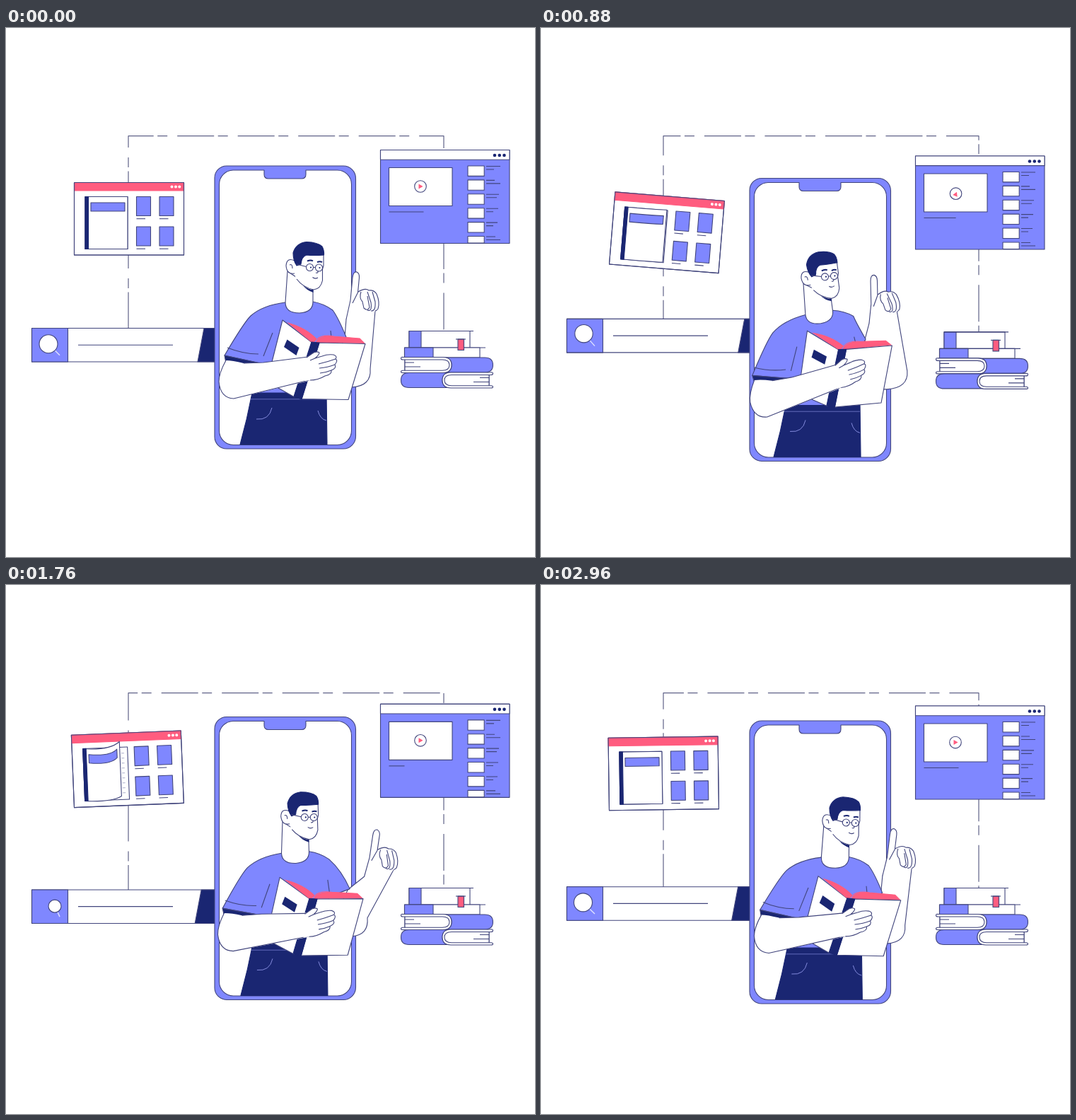
An HTML page with a canvas for the animation above (3.04 s loop, 748 by 748 pixels).

```html
<!DOCTYPE html>
<html>
<head>
<meta charset="utf-8">
<style>
html, body { margin: 0; width: 100%; height: 100%; overflow: hidden; background: #fff; }
canvas { display: block; width: 748px; height: 748px; }
</style>
</head>
<body>
<canvas id="stage" width="748" height="748"></canvas>
<script>
const ctx = document.getElementById('stage').getContext('2d');
const LOOP = 3040, STEP = 80;
const BLUE = '#7f87ff', NAVY = '#1a2672', PINK = '#ff5c7f', WHITE = '#fff', INK = '#41457c';
const TIMES = [0, 560, 1200, 1760, 2160, 2480, 2960];

// Smooth periodic curve through one value per entry of TIMES
function curve(vals, t) {
  const n = TIMES.length;
  const time = i => TIMES[(i + n) % n] + Math.floor(i / n) * LOOP;
  const val = i => vals[(i + n) % n];
  const slope = i => (val(i + 1) - val(i - 1)) / (time(i + 1) - time(i - 1));
  let i = n - 1;
  while (TIMES[i] > t) i--;
  const h = time(i + 1) - time(i), u = (t - time(i)) / h, u2 = u * u, u3 = u2 * u;
  return val(i) * (2 * u3 - 3 * u2 + 1) + val(i + 1) * (3 * u2 - 2 * u3) +
    slope(i) * h * (u3 - 2 * u2 + u) + slope(i + 1) * h * (u3 - u2);
}

// Rotation about (px, py) by deg, then a shift
function pose(px, py, deg, dx, dy) {
  return new DOMMatrix().translate(px + dx, py + dy).rotate(deg).translate(-px, -py);
}
function within(m, paint) {
  ctx.save();
  ctx.transform(m.a, m.b, m.c, m.d, m.e, m.f);
  paint();
  ctx.restore();
}
function at(m, x, y) {
  const p = m.transformPoint({ x, y });
  return p.x.toFixed(2) + ' ' + p.y.toFixed(2) + ' ';
}

function shape(d, fill, ink = INK, w = 1.1) {
  const p = new Path2D(d);
  if (fill) { ctx.fillStyle = fill; ctx.fill(p); }
  if (ink) { ctx.strokeStyle = ink; ctx.lineWidth = w; ctx.stroke(p); }
}
const line = (d, ink = INK, w = 1.1) => shape(d, null, ink, w);
const box = (x, y, w, h, fill, ink = INK) => shape(`M${x} ${y}h${w}v${h}h${-w}z`, fill, ink);
function disc(x, y, r, fill, ink = INK) {
  ctx.beginPath();
  ctx.arc(x, y, r, 0, 7);
  if (fill) { ctx.fillStyle = fill; ctx.fill(); }
  if (ink) { ctx.strokeStyle = ink; ctx.lineWidth = 1.1; ctx.stroke(); }
}

function connector(t) {
  ctx.setLineDash([52, 5.5, 14, 14]);
  ctx.lineDashOffset = -(14.5 + t * 3 * 85.5 / LOOP);
  line('M173 440V152.7H619V429', '#5f6288', 1.2);
  ctx.setLineDash([]);
}

function searchBar(t, s) {
  const y = 424.5 - 13.5 * s, mid = y + 23.7, x = 280 + 8 * s;
  box(36.5, y, 258.5, 47.5, WHITE);
  box(36.5, y, 51, 47.5, BLUE);
  shape(`M${x} ${y}H297V${y + 47.5}H${x - 9}z`, NAVY);
  const gap = 102 + 134 * (t - 1920) / 545;
  if (gap > 102 && gap < 236) line(`M102 ${mid}H${gap - 3}M${gap + 3} ${mid}H236`);
  else line(`M102 ${mid}H236`);
  const cx = 76 + curve([-16, -13, -17, -7, -22, -17, -16.5], t);
  const cy = mid + 14.5 + curve([-16, -18, -16.5, -15, -11, -16, -16], t);
  line(`M${cx} ${cy}L76 ${mid + 14.5}`, '#dfe1ff', 1.4);
  disc(cx, cy, curve([13, 12, 13, 9, 13.3, 13, 13], t), WHITE);
}

function catalog(t, s) {
  const k = Math.max(0, curve([0, 0, 0.25, 1, 0.45, 0.08, 0], t));
  within(pose(96.5, 321, 4.85 * s, 0, 13.4 * s), () => {
    box(96.5, 218.5, 155, 102.5, WHITE);
    box(96.5, 218.5, 155, 11.5, PINK, PINK);
    box(96.5, 218.5, 155, 102.5, null);
    [234.5, 240, 245.3].forEach(x => disc(x, 224.5, 2, WHITE, null));
    for (const x of [184.5, 217]) {
      for (const y of [238.5, 281]) {
        box(x, y, 20, 27, BLUE);
        line(`M${x} ${y + 31.2}h12.5`);
      }
    }
    box(112, 238.5, 60 + 3 * Math.min(1, k * 3), 74, WHITE);
    if (k > 0.5) for (let y = 247; y < 308; y += 7) line(`M166 ${y}h4`, '#9a9dc0', 0.8);
    const r = 172 - 8 * k;
    shape(`M112 238.5Q150 ${238.5 + 4 * k} ${r} ${238.5 - 8 * k}V${312.5 - 5 * k}Q150 ${312.5 + 3 * k} 112 312.5z`, WHITE);
    box(112, 238.5, 4.5, 74, NAVY, NAVY);
    shape(`M120 247Q150 ${247 + 4 * k} ${r - 4} ${247 - 6 * k}v12Q150 ${259 + 4 * k} 120 259z`, BLUE);
  });
}

function player(t, s) {
  const span = (a, b) => Math.min(1, Math.max(0, (t - a) / (b - a)));
  const p = span(800, 1333), q = span(2200, 2690);
  const bp = Math.sin(p * Math.PI), bq = Math.sin(q * Math.PI);
  within(pose(0, 0, 0, 0, 8.7 * s), () => {
    box(529.5, 172.5, 182.5, 132, BLUE);
    box(529.5, 172.5, 182.5, 13.7, WHITE);
    [691, 697.8, 704.5].forEach(x => disc(x, 180, 2.3, NAVY, null));
    box(541.5, 197.5, 89.5, 54, WHITE);
    const hop = curve([0, 0, 3, 0, -3.5, 3, 0], t);
    const cx = 586 + hop / 3, cy = 224 + hop;
    disc(cx, cy, 8.3, WHITE);
    within(pose(0, 0, 360 * (p + q), cx - 2 * bq, cy + 4 * bp - 3 * bq), () =>
      shape('M-2.5 -3.5L3.6 0L-2.5 3.5z', PINK, null));
    line(`M541.5 260h${curve([49, 40, 48, 22, 48, 49, 49], t)}`);
    [[20, 11], [12, 20], [18, 15], [17, 10], [16, 10], [13, 20]].forEach(([a, b], i) => {
      const y = 195 + i * 19.9;
      box(653, y, 23.2, i < 5 ? 14.4 : 9.5, WHITE);
      line(`M679 ${y + 0.5}h${a}M679 ${y + 5}h${b}`);
    });
  });
}

// One lying book, spine rounded to the left side's pages
function lyingBook() {
  shape('M564 466H677Q688.5 466 688.5 476.5T677 487H564z', BLUE);
  shape('M564 466H618Q630 466 630 476.5T618 487H564z', WHITE);
  line('M564 479H586M564 473H577');
  shape('M561 465.5H618Q630 465.5 630 476.5T618 487.5H561Q558.5 487.5 558.5 486T561 484.3H617Q627 484 627 476.5T617 469H561Q558.5 469 558.5 467T561 465.5z', WHITE);
}

function stack(t) {
  within(pose(0, 0, 0, 0, curve([0, 2.5, 0, 0, 0, 0, 0], t)), () => {
    box(570, 428.5, 86, 23.5, WHITE);
    box(570, 428.5, 17, 23.5, BLUE);
    line('M570 428.5H661M656 452H678');
    box(563.5, 452, 106.5, 14, WHITE);
    box(563.5, 452, 40.5, 14, BLUE);
    box(639, 440, 8.5, 15.5, PINK);
    line('M636 440H650');
    lyingBook();
    within(new DOMMatrix([-1, 0, 0, 1, 1247, 21.5]), lyingBook);
  });
}

function phone(s) {
  within(pose(0, 0, 0, 0, 18 * s), () => {
    shape('M312 195H477A17.5 17.5 0 0 1 494.5 212.5V577.5A17.5 17.5 0 0 1 477 595H312A17 17 0 0 1 295 578V212A17 17 0 0 1 312 195z', BLUE);
    shape('M321 201H365V207Q365 213 371 213H418Q424 213 424 207V201H468.5A20 20 0 0 1 488.5 221V569.5A20 20 0 0 1 468.5 589.5H321.5A20 20 0 0 1 301.5 569.5V221A20 20 0 0 1 321 201z', WHITE);
  });
}

function head() {
  shape('M398 344L395 388Q395 403 415 403Q434 402 434 387V368z', WHITE);
  shape('M408 322H449L447.5 337L447.5 357Q445 369 435 370Q419 368 409 352z', WHITE, null);
  shape('M420 364Q428 370 434.5 370V374Q425 371 420 364z', NAVY, null);
  line('M449 320V336L447.5 341V357Q445 369 435 370Q420 367 411 355');
  shape('M408 329Q397 324 396 336Q397 349 408 347z', WHITE, null);
  line('M408 329Q397 324 396 336Q397 349 408 347M401 335Q405 333 405 340');
  shape('M411 336Q406 329 406 318Q410 304 425 302.5Q441 303 447 309Q450 314 449.5 321Q435 322 425 321Q418 323 417 334z', NAVY, NAVY);
  line('M411 334L424.5 337.5M434.5 338.5H437.5');
  disc(429.5, 338.5, 5, WHITE);
  disc(442.5, 339, 5, WHITE);
  disc(431, 338.5, 1.1, NAVY, null);
  disc(443.5, 339, 1.1, NAVY, null);
  line('M426 329.5Q431 327.5 434 329.5M440 331Q444 329.5 447 331', NAVY, 2);
  line('M438 346Q442 347 441 343M433.5 352.5Q437 355.5 441 353');
}

function raisedArm(torso, hand, turn, s) {
  const low = 508 + (turn > 0 ? -0.7 * turn : 3 * s);
  const ex = 517 - 0.25 * turn;
  shape('M' + at(hand, 481, 412) + 'L' + at(torso, 479 + 0.5 * turn, 438 + 0.3 * turn) + `L465 470L475 ${low}L489 ${low}` +
    `Q${ex} ${low - 2} ${ex - 2} ${low - 26}L` + at(hand, 522, 400) + 'L' + at(hand, 500, 385) + 'z', WHITE);
  within(hand, () => {
    shape('M481 412L487 385L490 353Q491 344 496 345Q500 347 499.5 353L498 371Q508 367 513 371Q520 370 524 376Q529 388 526 397Q524 400 522 400L512 412z', WHITE, null);
    line('M481 412L487 385L490 353Q491 344 496 345Q500 347 499.5 353L497.5 374L490 389M498 373Q508 367 513 371Q520 370 524 376Q529 388 526 397Q524 400 522 400');
    line('M502 373Q499 382 504 387L506 396Q511 401 514 395L511 379M511 373L516 388Q518 402 511 399M518 373L522 387Q523 401 516 400');
  });
}

function shirt(turn) {
  const x = 481 + 0.55 * turn, y = 437 + 0.3 * turn;
  shape(`M395 388Q363 392 346 407Q336 417 309 463L359 474L348 522H453L460 452L${x} ${y}Q${x - 11} ${y - 27} 462 399Q450 390 434 387z`, BLUE);
  line('M313 452Q335 461 357 461M364 464L377 431M459 428L461 447');
}

function book() {
  shape('M391 413L369 500L408 522L433 445z', WHITE);
  shape('M397 416Q424 423 440 440L434 446z', PINK, null);
  shape('M437 445Q444 433 464 436L500 439L507 446z', PINK, null);
  line('M440 440Q447 433 464 436L500 439L507 446', PINK);
  shape('M397.5 440.5L414.5 452L410.5 463L393 451z', NAVY, null);
  shape('M443 445L508 446.5L484 525.5L418 524.5z', WHITE);
  shape('M432 444L443 445L418 525L407 521z', NAVY, NAVY);
}

function readingArm(torso, hold) {
  const a = (x, y) => at(torso, x, y), b = (x, y) => at(hold, x, y);
  const under = 'L' + a(311, 470) + 'Q' + a(301, 488) + a(301, 500) + 'Q' + a(303, 523) + a(322, 524);
  shape('M' + a(309, 463) + 'L' + a(360, 474) + 'L' + a(356, 480) + 'L' + a(311, 474) + 'z', NAVY);
  shape('M' + a(336, 474) + 'Q' + a(320, 470) + a(311, 470) + under + 'L' + b(432, 498) + 'L' + b(430, 464) + 'L' + a(364, 473) + 'z', WHITE, null);
  line('M' + a(336, 474) + 'L' + a(364, 473) + 'L' + b(427, 465));
  line('M' + under.slice(1) + 'L' + b(432, 497));
  within(hold, () => {
    const top = 'M425 466L432 461Q438 456 443 459Q443 462 437 467L447 464Q455 461 463 462Q469 464 466 468Q470 470 465 476Q468 481 460 484Q461 490 451 492Q441 498 430 498';
    shape(top + 'L422 499z', WHITE, null);
    line(top);
    line('M437 467L430 470M442 475Q455 472 466 468M443 481Q455 480 465 476M444 488Q453 487 460 484');
  });
}

function person(t, s) {
  const lean = curve([0, -6.5, -7.3, -2, 2.7, 3.8, 0.5], t);
  const turn = curve([0, -14.5, -3.5, 16, 21, 17, 1.3], t);
  const tilt = curve([0, -7, -4.5, 3, 11, 8, 1.5], t);
  const torso = pose(385, 545, lean, 0, 18 * s);
  const hold = pose(484, 525, 0.8 * lean, 0.4 * lean, 4.7 * s);
  const wrist = pose(500, 495, turn, 0, 0).transformPoint({ x: 500, y: 400 });
  const hand = pose(500, 400, tilt, wrist.x - 500, wrist.y - 400 - 0.15 * turn);

  raisedArm(torso, hand, turn, s);
  within(torso, () => {
    shirt(turn);
    head();
  });
  within(pose(0, 0, 0, -2 * s, 18 * s), () => {
    shape('M348 516H453L454 589H331Q341 553 348 516z', NAVY, NAVY);
    line('M346 524.8H453', '#6a72c4', 0.9);
    line('M354 553Q372 555 376 537M441 541Q444 553 453 555', '#8f96e8', 0.9);
  });
  within(hold, book);
  readingArm(torso, hold);
}

function frame(now) {
  const t = Math.floor((now % LOOP) / STEP) * STEP;
  const s = Math.sin(2 * Math.PI * t / LOOP);
  ctx.fillStyle = WHITE;
  ctx.fillRect(0, 0, 748, 748);
  ctx.lineJoin = 'round';
  connector(t);
  searchBar(t, s);
  catalog(t, s);
  player(t, s);
  stack(t);
  phone(s);
  person(t, s);
}

const start = performance.now();
function loop() {
  frame(performance.now() - start);
  requestAnimationFrame(loop);
}
loop();
</script>
</body>
</html>
```
